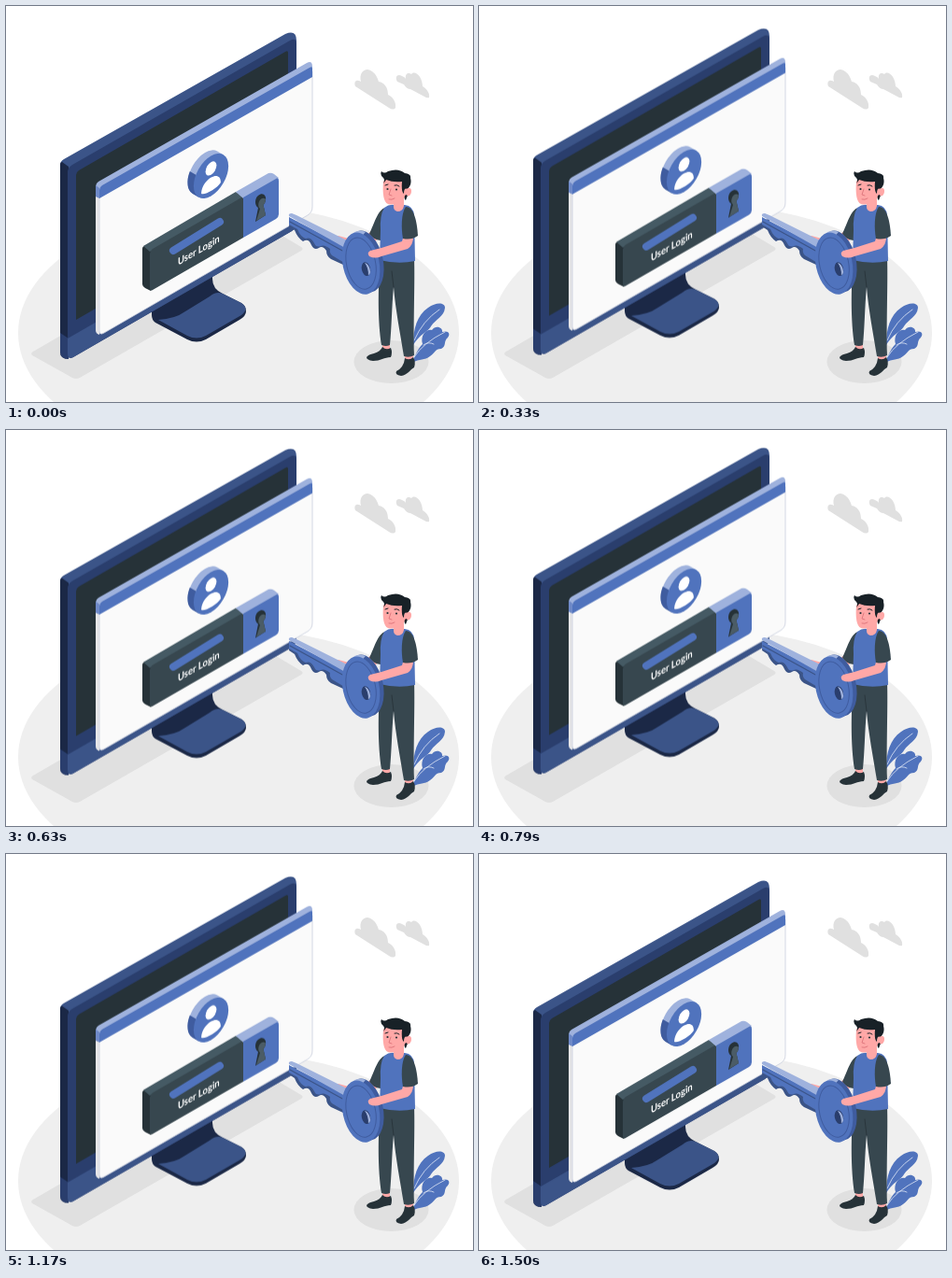
An HTML page for the animation above (1540 ms loop, 500x424 px).

```html
<!DOCTYPE html>
<html lang="en">
<head>
<meta charset="utf-8">
<title>User Login</title>
<style>
  html, body { margin: 0; width: 100%; height: 100%; overflow: hidden; background: #fff; }
  svg { display: block; width: 100%; height: 100%; }

  .blue { fill: #5073bd; }
  .light { fill: #9fb2dd; }
  .deep { fill: #3b5488; }
  .navy { fill: #2a3e6d; }
  .night { fill: #1b2846; }
  .slate { fill: #37474f; }
  .ink { fill: #263238; }
  .skin { fill: #ffa8a7; }
  .grey { fill: #e0e0e0; }
  .line { fill: none; stroke-linecap: round; stroke-linejoin: round; }

  .label { font: 700 11px Lato, sans-serif; fill: #fff; }

  .float { animation: float 1540ms linear infinite; }
  /* 750 ms up, 750 ms down, 40 ms rest */
  @keyframes float {
    0%, 97.403%, 100% { transform: translateY(0); }
    48.701% { transform: translateY(-10px); }
  }
</style>
</head>
<body>
<svg viewBox="0 0 500 424" xmlns="http://www.w3.org/2000/svg">
  <!-- floor and shadows -->
  <ellipse cx="249" cy="350" rx="236" ry="136" fill="#efefef"/>
  <path class="grey" d="M28 374Q26 372 29 370L266 233Q270 231 274 233L316 258Q319 260 316 262L79 398Q75 400 71 398Z"/>
  <ellipse class="grey" cx="412.500" cy="381" rx="40" ry="23"/>

  <!-- clouds -->
  <path class="grey" d="M374 86C372 81 375 78 380 81C378 73 382 68 387 68C393 69 397 74 399 81C405 82 409 87 409 95C414 97 418 103 417 109Q415 112 410 109Z"/>
  <path class="grey" d="M419 81C416 76 419 72 424 75Q427 76 428 78C427 72 431 71 434 73C438 68 446 76 446 86C451 89 454 94 453 98Q451 99 448 97L433 89Q429 89 426 84Z"/>

  <g class="float">
    <!-- stand -->
    <path class="night" d="M156 326L221 288V292Q221 303 232 308L252 318Q257 321 257 327Q257 332 250 336L214 357Q204 362 194 357L160 339Q156 336 156 331Z"/>
    <path class="deep" d="M163 336Q181 335 192 327L218 311Q225 305 232 308L252 318Q261 324 252 331L214 353Q204 358 194 353Z"/>

    <!-- monitor -->
    <path class="deep" d="M58 171Q58 166 62 164L299 30Q311 25 311 37V60L66 200L58 178Z"/>
    <path class="night" d="M58 170Q58 167 60 167L67 172V378Q58 378 58 370Z"/>
    <path class="navy" d="M58 350L67 356V378Q58 378 58 370Z"/>
    <path class="navy" d="M66 178Q66 173 71 170L304 37Q311 33 311 41V232Q311 238 306 241L72 376Q66 379 66 372Z"/>
    <path class="deep" d="M66 356L311 215V232Q311 238 306 241L72 376Q66 379 66 372Z"/>
    <path class="ink" d="M75 181Q75 178 78 176L299 49Q302 47 302 50V205L75 336Z"/>

    <!-- window -->
    <path d="M96 194L100 198V352Q96 351 96 347Z" fill="#e6e6e8"/>
    <path d="M100 200L328 70V215Q328 221 323 224L105 350Q100 353 100 348Z" fill="#fafafa" stroke="#c9cede" stroke-width=".8"/>
    <path class="light" d="M96 193Q96 190 99 188L322 61Q328 58 328 65L328 70L100 200L96 203Z"/>
    <path class="blue" d="M100 197Q100 194 103 192L325 66Q328 64 328 67V76L100 206Z"/>
    <path d="M96 192L100 195V206L96 204Z" fill="#6f8ac9"/>

    <!-- avatar badge, drawn flat on the screen plane -->
    <g transform="matrix(.866 -.5 0 1 219.500 182)">
      <path class="light" d="M15.200-15.200L7.700-22.700A21.500 21.500 0 0 0-22.700 7.700L-15.200 15.200Z"/>
      <path d="M-18.700-10.700L-26.200-18.200A21.500 21.500 0 0 0-22.700 7.700L-15.200 15.200Z" fill="#3f5c9f"/>
      <circle class="blue" r="21.500"/>
      <circle cy="-8" r="6.800" fill="#fff"/>
      <path d="M-12 13C-12-2 12-2 12 13C8 17-8 17-12 13Z" fill="#fff"/>
    </g>

    <!-- login bar -->
    <path class="ink" d="M146 260Q146 257 149 257L155 262V305L149 302Q146 300 146 298Z"/>
    <path d="M147 257L246 199L255 205L154 263Z" fill="#455a64"/>
    <path class="slate" d="M154 265Q154 262 157 260L254 204V248L157 304Q154 306 154 302Z"/>
    <path class="light" d="M246 199L281 179Q284 178 287 180L292 184L254 206Z"/>
    <path class="blue" d="M254 205L289 185Q292 183 292 187V223Q292 226 289 228L254 248Z"/>
    <path class="line" d="M179 262L229 231" stroke="#5073bd" stroke-width="8"/>
    <text class="label" transform="matrix(.866 -.5 0 1 184 278)">User Login</text>

    <!-- keyhole -->
    <path class="ink" d="M270 216C266 214 266 206 270 203C275 199 279 203 278 208Q277 212 275.500 213L278 224L267 231Z"/>
    <path d="M272 217C269 215 270 208 274 206Q277 205 278 207Q278 211 275.500 213L278 224L268 230Z" fill="#4b5c66"/>
  </g>

  <!-- leaves -->
  <path class="blue" d="M436 362C436 346 440 331 452 323C460 317 470 317 470 323C469 333 460 335 455 343C451 350 444 350 436 363Z"/>
  <path class="blue" d="M435 382C439 371 442 366 446 362C443 352 451 345 456 347C460 341 468 344 467 349C474 347 476 351 473 355C468 359 472 364 466 367C459 367 459 372 454 375C448 380 443 377 435 382Z"/>
  <path class="line" d="M437 358Q446 337 464 325M437 376Q446 361 470 349M447 363Q452 359 458 362" stroke="#dfe6f5" stroke-width=".8"/>

  <!-- far arm -->
  <path class="skin" d="M392 240L401 246L391 257L366 256L352 250Q351 247 356 246L367 249L382 249Z"/>
  <path class="slate" d="M406 216C398 218 394 234 389 244Q393 250 401 251L410 232Z"/>

  <!-- legs -->
  <path class="skin" d="M403 360H411V371H403ZM427 372H436V382H427Z"/>
  <path class="ink" d="M403 365Q407 369 412 366Q414 371 412 376C405 376 401 380 393 380Q386 379 386 376Q388 373 394 372Q401 370 403 365Z"/>
  <path class="ink" d="M427 377Q432 380 436 376Q439 381 437 387C433 389 430 395 423 396Q416 395 418 391Q426 387 427 377Z"/>
  <path class="slate" d="M401 270L437 270C438 294 436 340 437 374Q432 377 426 375C422 350 417 325 415 301C413 321 413 344 411 363Q407 365 402 363C398 338 398 301 401 270Z"/>
  <path class="line" d="M415 301L413 284" stroke="#263238" stroke-width=".8"/>

  <!-- torso -->
  <path class="blue" d="M405 216Q410 212 416 213H427Q436 214 437 224L438 273Q420 277 400 272L401 240Q400 224 405 216Z"/>
  <path class="skin" d="M415 205H426V214Q425 220 419 220Q415 219 415 215Z"/>

  <!-- head -->
  <path class="skin" d="M404 188C403 200 404 210 409 212C416 214 425 210 428 203C434 206 436 196 430 194L428 184L407 182Z"/>
  <path d="M404 190Q406 186 404 184Q400 181 402 177Q405 180 409 177Q420 173 427 179Q434 180 433 184Q435 191 430 196Q426 194 426 201Q423 199 424 188Q414 189 407 186Q406 188 404 190ZM427 203L431 200L428 208Q426 207 427 203Z" fill="#182127"/>
  <ellipse class="skin" cx="431" cy="199" rx="2.800" ry="4.200" transform="rotate(15 431 199)"/>
  <circle class="ink" cx="408.500" cy="196" r="1.100"/>
  <circle class="ink" cx="418" cy="196.500" r="1.100"/>
  <path class="line" d="M406 192L409 191M416 192Q419 191 421 193" stroke="#182127" stroke-width="1"/>
  <path class="line" d="M412 196L410 202L413 203M410 207Q413 208 416 206" stroke="#d96e75" stroke-width=".8"/>

  <!-- key -->
  <path class="deep" d="M303 236L309 240Q312 248 318 252Q324 248 327 256Q330 262 335 259Q339 256 343 262Q343 268 348 271L361 277V262L304 228Z"/>
  <path class="blue" d="M303 226L364 258V276L349 267Q346 264 347 260Q341 255 337 257Q332 259 330 254Q326 247 321 249Q315 247 312 239L303 234Z"/>
  <path class="light" d="M303 225Q302 222 306 222L311 224L367 252L363 259Z"/>
  <path class="line" d="M304 231L362 263" stroke="#3b5488" stroke-width="1.200"/>
  <g transform="rotate(-12 383 275)">
    <ellipse cx="385" cy="274" rx="19" ry="33.500" fill="#3f5c9f"/>
    <path class="light" d="M376 243Q383 238 392 243L388 246Z"/>
    <ellipse class="blue" cx="380" cy="275" rx="19.500" ry="33.500"/>
    <ellipse class="line" cx="380" cy="275" rx="15.500" ry="28" stroke="#3f5c9f" stroke-width="1"/>
    <ellipse class="navy" cx="384" cy="282" rx="4.600" ry="7.500"/>
    <path class="light" d="M384 275Q389 278 388 286Q387 289 385 289Q387 282 384 275Z"/>
  </g>

  <!-- near arm -->
  <path class="skin" d="M426 245L436 247Q436 256 430 260L402 268Q395 271 389 268Q386 264 390 262L402 259L424 252Z"/>
  <path class="slate" d="M428 215C437 215 440 231 441 246Q434 251 425 249C423 238 423 222 428 215Z"/>
</svg>
</body>
</html>
```
